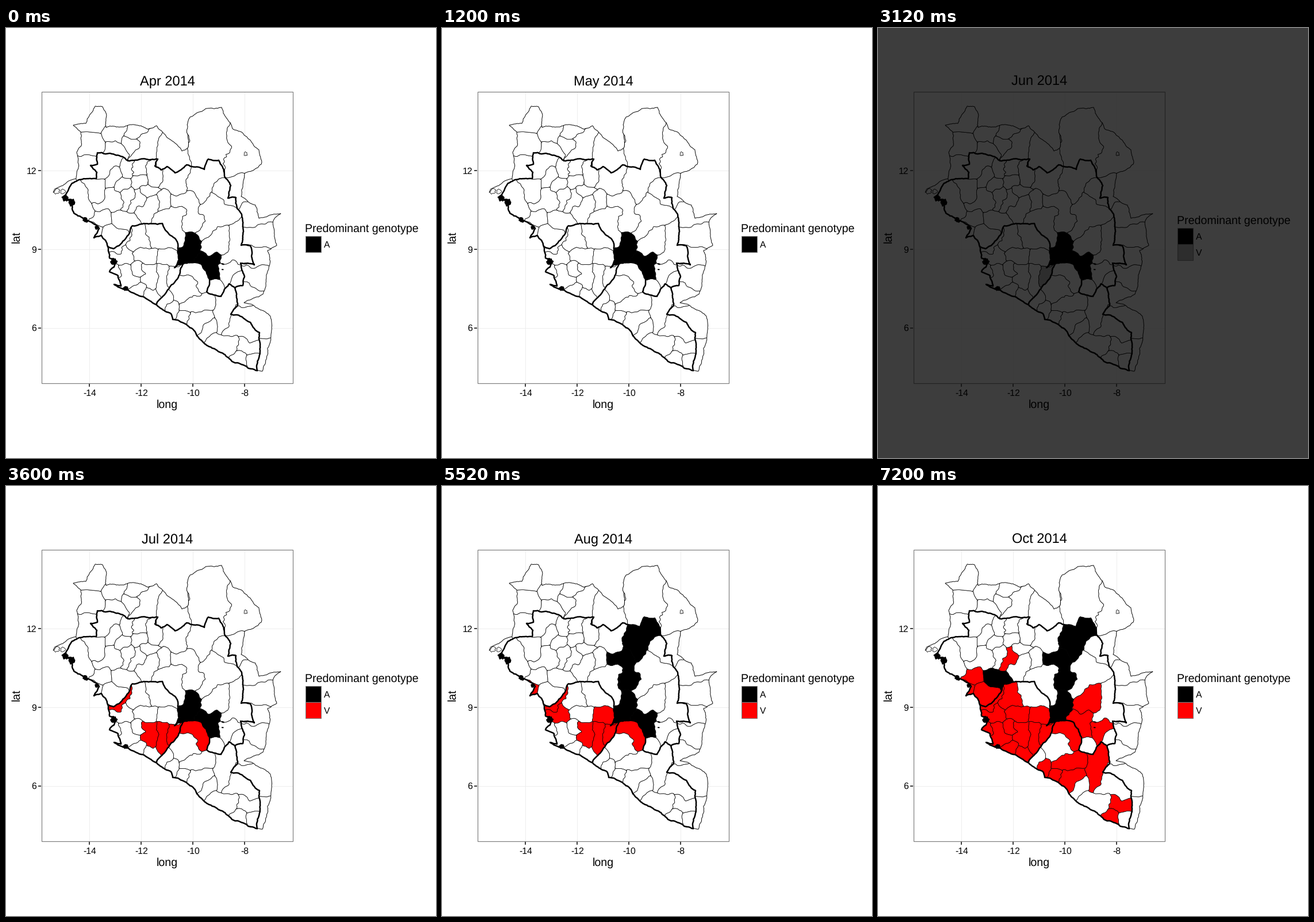
These frames come from a looping animation (748x748 px, 8000 ms). A matplotlib script:

```python
import math
import random

import matplotlib.pyplot as plt
import numpy as np
from matplotlib.animation import FuncAnimation
from matplotlib.patches import PathPatch, Polygon, Rectangle

SIZE, DPI = 748, 88
PX = 72 / DPI          # points per pixel
HOLD = 3               # ticks of 400 ms per month
MONTHS = ["Apr", "May", "Jun", "Jul", "Aug", "Sep", "Oct"]
DIM = 2                # the month shown in the dark palette
THIN, THICK = 0.75, 2.5

LIGHT = dict(bg="white", grid="#ebebeb", edge="#7f7f7f", A="black", V="red")
DARK = dict(bg="#3d3d3d", grid="#3b3b3b", edge="#232323", A="black", V="#2d2d2d")

plt.rcParams["text.hinting"] = "none"
fig = plt.figure(figsize=(8.5, 8.5), dpi=DPI)
ax = fig.add_axes([0, 0, 1, 1])
ax.set(xlim=(0, SIZE), ylim=(SIZE, 0))
ax.axis("off")

rng = random.Random(5)
gx, gy = np.meshgrid(np.arange(70, 492, 2.0), np.arange(124, 608, 2.0))
districts = []


def rough(p, q):
    """Midpoint displacement between two points, without the end point."""
    (x, y), (u, v) = p, q
    if math.hypot(u - x, v - y) < 3:
        return [p]
    k = rng.uniform(-0.1, 0.1)
    mid = ((x + u) / 2 - (v - y) * k, (y + v) / 2 + (u - x) * k)
    return rough(p, mid) + rough(mid, q)


def trace(*v):
    """Natural looking line through a few key points."""
    keys = list(zip(v[::2], v[1::2]))
    line = [pt for p, q in zip(keys, keys[1:]) for pt in rough(p, q)]
    return line + keys[-1:]


def wobble():
    """Smooth noise field that bends the district borders."""
    field = np.zeros_like(gx)
    for wave in (44, 26, 15, 9):
        for _ in range(3):
            turn, phase = rng.uniform(0, math.tau), rng.uniform(0, math.tau)
            along = gx * math.cos(turn) + gy * math.sin(turn)
            field += wave * 0.035 * np.sin(math.tau * along / wave + phase)
    return field


def split(outline, z, *cells):
    """Divide an area among cells: each point goes to the nearest seed.

    A cell holds one letter per month (A, V or a dot) and its seed points.
    """
    shape = ax.add_patch(Polygon(outline, fill=False, lw=0))
    reach = np.array([
        np.min([np.hypot(warp_x - x, warp_y - y)
                for x, y in zip(seeds[::2], seeds[1::2])], axis=0)
        for _, *seeds in cells])
    for i, cell in enumerate(cells):
        lead = np.delete(reach, i, axis=0).min(axis=0) - reach[i]
        area = ax.contourf(gx, gy, lead, levels=[0, 1e6])
        patch = PathPatch(area.get_paths()[0], ec="black", lw=THIN * PX, zorder=z)
        area.remove()
        ax.add_patch(patch)
        patch.set_clip_path(shape)
        districts.append((patch, cell[0]))


def stroke(line, width, z):
    ax.plot(*zip(*line), color="black", lw=width * PX, zorder=z,
            solid_joinstyle="round", solid_capstyle="round")


def islet(x, y, r, fill):
    ring = [(x + r * rng.uniform(0.6, 1.3) * math.cos(a),
             y + r * rng.uniform(0.6, 1.3) * math.sin(a))
            for a in np.arange(0, math.tau, 0.5)]
    ax.add_patch(Polygon(ring, fill=fill, fc="black", ec="black",
                         lw=(1.5 if fill else THIN) * PX, zorder=4))


def label(x, y, text, size, **kw):
    return ax.text(x, y, text, fontsize=size * PX, family="Liberation Sans",
                   va="baseline", zorder=6, **kw)


warp_x, warp_y = gx + wobble(), gy + wobble()

# Coast from north-west to south-east, in three parts
coast_n = trace(103, 291, 118, 322, 133, 330, 162, 349, 153, 365, 166, 361, 177, 380)
coast_m = trace(177, 380, 180, 400, 193, 406, 180, 424, 195, 431, 200, 449,
                188, 446, 215, 458, 238, 467, 261, 481)
coast_s = trace(261, 481, 287, 497, 290, 507, 306, 512, 338, 542, 393, 580,
                437, 596)

# Country borders
north = trace(103, 291, 115, 270, 157, 262, 158, 251, 147, 239, 159, 237, 159, 217,
              185, 219, 212, 231, 264, 228, 259, 240, 270, 247, 280, 241, 294, 252,
              314, 238, 345, 246, 352, 228, 370, 230, 380, 258, 391, 274, 386, 296,
              400, 295, 402, 314, 411, 330, 409, 378, 425, 379, 432, 412, 408, 409,
              415, 432, 412, 448, 398, 452)
middle = trace(398, 452, 388, 445, 374, 467, 349, 459, 354, 437, 340, 411, 310, 409)
inner = trace(177, 380, 187, 384, 203, 371, 220, 344, 240, 340, 272, 340, 298, 372,
              301, 403, 293, 417, 310, 409)
river = trace(310, 409, 299, 435, 283, 454, 261, 481)
southeast = trace(398, 452, 403, 482, 391, 498, 425, 512, 441, 530, 442, 553,
                  437, 596)

# Outer edge of the neighbouring districts
rim = trace(82, 286, 103, 271, 122, 262, 123, 217, 131, 205, 130, 181, 117, 169,
            139, 166, 155, 136, 168, 137, 174, 173, 222, 168, 247, 176, 262, 170,
            290, 197, 306, 214, 316, 209, 320, 155, 348, 140, 375, 138, 394, 175,
            411, 182, 440, 212, 444, 237, 415, 253, 409, 293, 434, 308, 440, 331,
            478, 323, 465, 335, 471, 378, 455, 387, 457, 419, 447, 463, 414, 478,
            440, 489, 460, 502, 460, 545, 446, 597, 437, 596)

split(rim + (coast_n + coast_m + coast_s)[::-1], 1,
      ("." * 7, 100, 278), ("." * 7, 140, 243), ("." * 7, 148, 200),
      ("." * 7, 150, 166), ("." * 7, 192, 184), ("." * 7, 192, 211),
      ("." * 7, 217, 201), ("." * 7, 224, 180), ("." * 7, 238, 217, 246, 200),
      ("." * 7, 280, 212), ("." * 7, 355, 192, 365, 215),
      ("." * 7, 415, 195, 405, 228), ("." * 7, 410, 284),
      ("." * 7, 435, 324), ("." * 7, 440, 366), ("." * 7, 436, 396),
      ("." * 7, 434, 432), ("." * 7, 422, 464), ("." * 7, 430, 504, 452, 520),
      ("." * 7, 450, 560))

# Northern country
split(north + middle + inner[::-1] + coast_n[::-1], 2,
      ("AAAAAAA", 322, 374, 322, 398, 304, 405),
      ("AAAAAVV", 342, 403, 362, 405, 361, 425),
      (".....VV", 360, 375, 352, 383, 375, 360, 372, 380),
      (".....VV", 382, 432, 390, 418),
      (".....VV", 167, 333),
      ("....AAA", 362, 242, 352, 268, 334, 260, 335, 283),
      ("....AAA", 301, 300, 318, 303, 325, 324, 322, 340),
      ("....VVV", 163, 355),
      ("......V", 177, 353, 177, 368, 192, 371),
      ("......A", 198, 333, 215, 332),
      ("......V", 234, 292, 224, 304),
      ("." * 7, 357, 322, 375, 330, 350, 352, 362, 302, 385, 320),
      ("." * 7, 374, 284, 392, 295),
      ("." * 7, 390, 402, 400, 377, 400, 358),
      ("." * 7, 364, 450), ("." * 7, 404, 436),
      ("." * 7, 300, 255, 300, 278, 285, 265),
      ("." * 7, 298, 318, 275, 328, 292, 340, 296, 362),
      ("." * 7, 275, 302), ("." * 7, 242, 323, 252, 304),
      ("." * 7, 250, 283), ("." * 7, 258, 258), ("." * 7, 230, 250),
      ("." * 7, 228, 270), ("." * 7, 213, 290, 207, 302),
      ("." * 7, 205, 271), ("." * 7, 214, 247), ("." * 7, 180, 231, 163, 249),
      ("." * 7, 186, 262), ("." * 7, 157, 275, 160, 294),
      ("." * 7, 166, 305, 184, 295, 192, 308),
      ("." * 7, 125, 290, 138, 320))

# Western country
split(inner + river + coast_m[::-1], 2,
      ("...VVVV", 187, 383, 202, 371, 212, 363),
      ("....VVV", 188, 398, 207, 384, 207, 401),
      (".....VV", 187, 424),
      (".....VV", 207, 425, 206, 437, 222, 441),
      (".....VV", 232, 422),
      (".....VV", 225, 360, 222, 376, 238, 376),
      (".....VV", 232, 394, 252, 395),
      ("....VVV", 276, 397, 290, 400),
      ("...VVVV", 251, 421, 243, 440, 256, 438),
      ("...VVVV", 272, 425, 272, 440, 274, 455),
      ("..VVVVV", 296, 425, 290, 442),
      (".....VV", 255, 460),
      ("......V", 228, 455),
      ("." * 7, 260, 355, 260, 369, 276, 370, 290, 372))

# Southern country
split(middle[::-1] + southeast + coast_s[::-1] + river[::-1], 2,
      ("...VVVV", 312, 421, 332, 424, 349, 448),
      (".....VV", 350, 476, 333, 481, 317, 485),
      (".....VV", 308, 500),
      (".....VV", 329, 511, 349, 503),
      (".....VV", 378, 475, 378, 500, 377, 518),
      (".....VV", 413, 552, 432, 556),
      ("......V", 292, 490),
      ("......V", 408, 574),
      ("." * 7, 273, 477),
      ("." * 7, 310, 445, 326, 451, 321, 459, 303, 463),
      ("." * 7, 353, 520),
      ("." * 7, 398, 512, 388, 526, 413, 528, 432, 530),
      ("." * 7, 372, 545, 391, 552, 376, 562),
      ("." * 7, 434, 582))

stroke(rim, THIN + 0.2, 3)
for line in (coast_n, coast_m, coast_s, north, middle, inner, river, southeast):
    stroke(line, THICK, 4)
for x, y, r in ((103, 296, 5), (114, 303, 6), (138, 334, 4), (158, 347, 3),
                (187, 406, 5), (208, 453, 4)):
    islet(x, y, r, True)
for x, y, r in ((88, 284, 5), (99, 285, 4), (417, 219, 3)):
    islet(x, y, r, False)

# Panel, grid and axes
box = dict(xy=(62, 111), width=437.5, height=507)
panel = ax.add_patch(Rectangle(**box, zorder=0, lw=0))
frame = ax.add_patch(Rectangle(**box, fill=False, lw=1.2 * PX, zorder=5))
grid = []
tick_style = dict(color="#111111", lw=1.6 * PX, zorder=5, solid_capstyle="butt")
for i, lat in enumerate((12, 9, 6)):
    y = 248 + 136.8 * i
    grid += ax.plot([62, 499.5], [y, y], lw=0.9 * PX, zorder=0.5)
    ax.plot([56.5, 61.5], [y, y], **tick_style)
    label(53, y + 5.7, str(lat), 15.7, ha="right")
for i, lon in enumerate((-14, -12, -10, -8)):
    x = 145.5 + 90 * i
    grid += ax.plot([x, x], [111, 618], lw=0.9 * PX, zorder=0.5)
    ax.plot([x, x], [619, 624], **tick_style)
    label(x, 640, str(lon), 15.7, ha="center")
label(280.5, 661, "long", 19.6, ha="center")
label(28, 364, "lat", 19.6, ha="right", rotation=90).set(va="center")
title = label(281, 100, "", 23.6, ha="center")

# Legend
heading = label(520, 355, "Predominant genotype", 19.6)
keys = []
for name in "AV":
    swatch = Rectangle((521, 362), 27.5, 27.5, lw=1.1 * PX, zorder=5)
    ax.add_patch(swatch)
    keys.append((name, swatch, label(552.5, 382, name, 15.7)))


def update(tick):
    month = tick // HOLD
    look = DARK if month == DIM else LIGHT
    fig.set_facecolor(look["bg"])
    panel.set_facecolor(look["bg"])
    frame.set_edgecolor(look["edge"])
    for line in grid:
        line.set_color(look["grid"])
    for patch, states in districts:
        patch.set_facecolor(look.get(states[month], look["bg"]))

    title.set_text(f"{MONTHS[month]} 2014")
    both = month >= DIM
    top = 348 if both else 362
    heading.set_y(top - 7)
    for i, (name, swatch, text) in enumerate(keys):
        y = top + 28 * i
        swatch.set(y=y, facecolor=look[name], edgecolor=look["edge"])
        text.set_y(y + 20)
        for part in (swatch, text):
            part.set_visible(both or i == 0)
    return []


anim = FuncAnimation(fig, update, frames=20, interval=400, repeat=True,
                     repeat_delay=0, blit=False)
plt.show()
```
